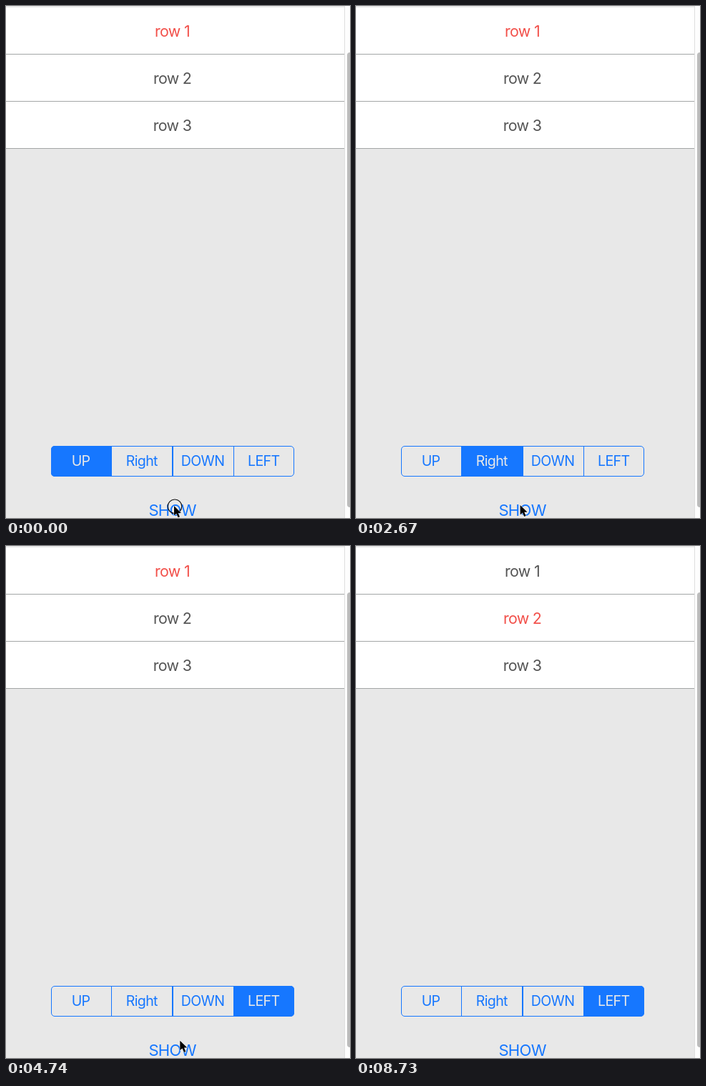
Write an HTML page that moves like this. It is 481 px wide and 717 px high and loops after 8.96 s.

```html
<!DOCTYPE html>
<html lang="en">
<head>
<meta charset="utf-8">
<title>Sliding menu</title>
<style>
html, body { margin: 0; width: 100%; height: 100%; overflow: hidden; background: #e8e8e8; }
svg { display: block; width: 481px; height: 717px; }
text { font-family: Inter, "Open Sans", sans-serif; text-anchor: middle; letter-spacing: -.033em; }
#rows text { font-size: 21.4px; }
#labels text { font-size: 19.6px; }
#show { font-size: 22.1px; fill: #1677ff; }
</style>
</head>
<body>
<svg viewBox="0 0 481 717">
  <defs>
    <clipPath id="menuClip"><rect y="2" width="473" height="198"/></clipPath>
    <clipPath id="segClip"><rect x="63" y="616" width="340" height="43" rx="5"/></clipPath>
  </defs>
  <rect width="481" height="717" fill="#e8e8e8"/>
  <g clip-path="url(#menuClip)">
    <g id="menu">
      <rect y="2" width="473" height="198" fill="#fff"/>
      <g id="rows"></g>
      <g id="lines" fill="#a3a6a6"></g>
    </g>
  </g>
  <g clip-path="url(#segClip)"><rect id="pick" y="616" width="85" height="43" fill="#1677ff"/></g>
  <rect x="63.5" y="616.5" width="339" height="42" rx="4.5" fill="none" stroke="#1677ff"/>
  <path d="M147.5 616V659M318.5 616V659" stroke="#1677ff"/>
  <path d="M233 616V659" stroke="#1677ff" stroke-width="2"/>
  <g id="labels"></g>
  <text id="show" x="232.6" y="714">SHOW</text>
  <rect x="474" width="7" height="717" fill="#fdfdfd"/>
  <rect x="473" width="1" height="717" fill="#dedede"/>
  <rect x="477" y="65" width="8" height="637" rx="4" fill="#bcbcbc"/>
  <g id="cursor">
    <circle id="ring" cx="1" cy=".8" r="9.8" fill="none" stroke="#111" stroke-width="1.2"/>
    <path d="M0 0V13.6L3.2 10.7L5.6 16.2L8 15.2L5.7 9.9H10Z" fill="#000" stroke="#fff" paint-order="stroke" stroke-linejoin="round"/>
  </g>
</svg>
<script>
const LOOP = 8960, STEP = 148, WIDTH = 473, HEIGHT = 198;
const TRAVEL = 280, REST = 150, FADE = 420;
const NS = 'http://www.w3.org/2000/svg';
const $ = id => document.getElementById(id);

function add(parent, tag, attrs, content = '') {
  const node = document.createElementNS(NS, tag);
  for (const key in attrs) node.setAttribute(key, attrs[key]);
  node.textContent = content;
  return parent.appendChild(node);
}

const segX = i => 62.5 + 85.2 * i;
const rows = [0, 1, 2].map(i => {
  add($('lines'), 'rect', { y: 67 + 66 * i, width: WIDTH, height: 1 });
  return add($('rows'), 'text', { x: 232.5, y: 43 + 66 * i }, 'row ' + (i + 1));
});
const labels = ['UP', 'Right', 'DOWN', 'LEFT'].map((name, i) =>
  add($('labels'), 'text', { x: segX(i) + 42.1, y: 644.3 }, name));

// Side each menu enters from: top, right, bottom, left
const sides = [[0, -1], [1, 0], [0, 1], [-1, 0]];

// Cursor stops in order; each tap also changes the state
const showTap = (at, side) => ({ at, x: 230, y: 699.5, tap: true, state: { side, shown: at } });
const segTap = (at, seg) => ({ at, x: segX(seg) + 40, y: 634, tap: true, state: { seg } });
const rowTap = (at, row) => ({ at, x: 240 - 14 * row, y: 37 + 62 * row, tap: true, state: { row } });
const stops = [
  { at: 0, x: 235, y: 700, tap: true, state: { seg: 0, row: 0, side: 0, shown: -LOOP } },
  ...[1035, 2830, 3825, 4942].flatMap((at, i) =>
    i ? [segTap(at - 450, i), showTap(at, i)] : [showTap(at, i)]),
  { at: 5721, x: 158, y: 160 },
  rowTap(6200, 2), rowTap(7540, 0), rowTap(8140, 1),
  { at: 8880, x: 485, y: 680 }
];

const clamp = p => Math.min(1, Math.max(0, p));
const smooth = p => p * p * (3 - 2 * p);

// Share of the distance left on a spring with damping ratio 0.8
function spring(ms) {
  const u = ms * .01495;
  return Math.exp(-.8 * u) * (Math.cos(.6 * u) + 4 / 3 * Math.sin(.6 * u));
}

function cursorAt(t) {
  let { x, y } = stops[0];
  for (const s of stops.slice(1)) {
    const p = smooth(clamp((t - s.at + REST + TRAVEL) / TRAVEL));
    x += (s.x - x) * p;
    y += (s.y - y) * p;
  }
  return [x, y];
}

function draw(time) {
  const t = Math.floor((time + 12) / STEP) * STEP;
  const state = Object.assign({}, ...stops.filter(s => s.at <= t).map(s => s.state));

  const age = t - state.shown, left = spring(age), [sx, sy] = sides[state.side];
  const dx = Math.round(sx * WIDTH * Math.max(0, left));
  const dy = Math.round(sy * HEIGHT * left * 2) / 2;
  $('menu').setAttribute('transform', `translate(${dx} ${dy})`);
  // Hairlines drop out between whole pixels
  $('lines').style.display = dy % 1 ? 'none' : '';
  $('show').style.opacity = .2 + .8 * smooth(clamp(age / FADE));

  rows.forEach((row, i) => row.setAttribute('fill', i === state.row ? '#f2504a' : '#555'));
  labels.forEach((label, i) => label.setAttribute('fill', i === state.seg ? '#e8e8e8' : '#1677ff'));
  $('pick').setAttribute('x', segX(state.seg));

  $('cursor').setAttribute('transform', `translate(${cursorAt(t)})`);
  $('ring').style.display = stops.some(s => s.tap && Math.abs(t - s.at) < STEP / 2) ? '' : 'none';
}

const start = performance.now();
function tick() {
  draw((performance.now() - start) % LOOP);
  requestAnimationFrame(tick);
}
tick();
</script>
</body>
</html>
```
